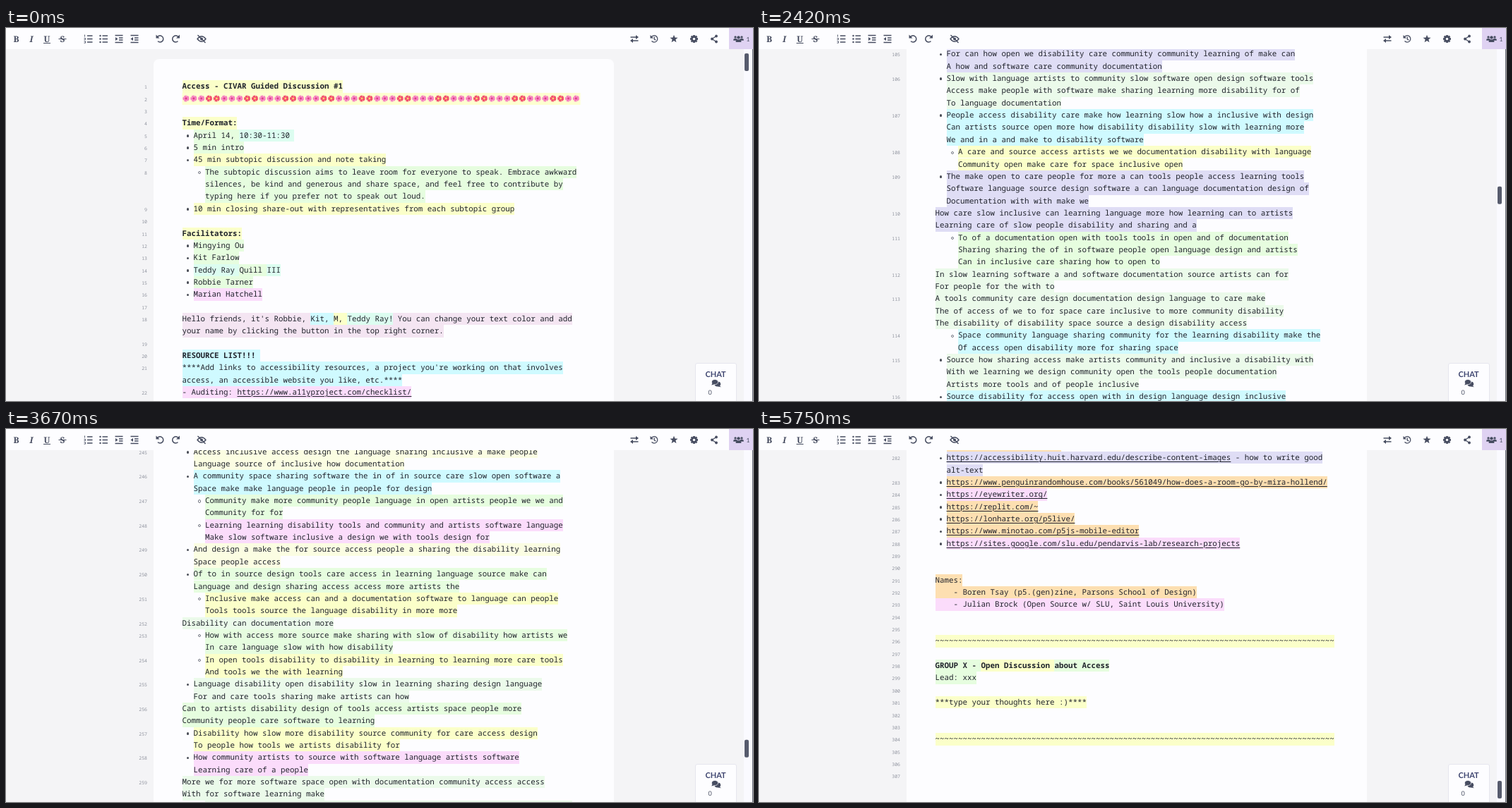
Recreate the animation shown at these times as an HTML page. Size 1058x529 px, loop 6010 ms.

```html
<!DOCTYPE html>
<html lang="en">
<head>
<meta charset="utf-8">
<title>Shared notes</title>
<style>
html, body { margin: 0; width: 100%; height: 100%; overflow: hidden; background: #f4f4f6; }
body { position: relative; text-rendering: geometricPrecision; }
#view { position: absolute; left: 0; top: 30px; width: 1058px; height: 499px; overflow: hidden; }
#pad { position: absolute; left: 0; top: -30px; width: 1058px; }
#card { position: absolute; left: 209px; top: 44px; width: 652px; height: 10300px; border-radius: 8px; background: #fdfdff; }
.row { position: absolute; left: 0; height: 17.35px; white-space: pre; color: #20232c;
  font: 10.84px/17.35px "Noto Sans Mono", "DejaVu Sans Mono", monospace; }
.row b, .row span { display: inline-block; font-weight: inherit; }
.row.h { font-weight: 700; }
.row u { text-underline-offset: 1.5px; text-decoration-thickness: 1px; }
.row i { position: absolute; right: calc(100% - 200px); top: 1px; font-style: normal; font-weight: 400; font-size: 6.5px; color: #8f939e; }
.row s { position: absolute; top: 7.4px; width: 3.6px; height: 3.6px; border-radius: 50%; background: #4a4d57; }
.row s.o { width: 2.2px; height: 2.2px; background: none; border: .8px solid #777a85; }
svg { position: absolute; left: 0; top: 0; }
#bar { background: #fdfdff; }
#track { position: absolute; left: 1045px; top: 30px; width: 12px; height: 499px; background: #fafaff; border-right: 1px solid #686b78; }
#thumb { position: absolute; left: 1px; top: 0; width: 6px; height: 25px; border-radius: 2px; background: #575c6d; }
#chat { position: absolute; left: 976px; top: 475px; width: 57px; height: 60px; background: #fdfdff;
  border: 1px solid #e6e6ee; border-radius: 3px 3px 0 0; }
</style>
</head>
<body>
<div id="view"><div id="pad"><div id="card"></div></div></div>
<div id="track"><div id="thumb"></div></div>
<div id="chat"></div>
<svg id="bar" width="1058" height="30"></svg>
<svg id="talk" width="1058" height="529" fill="#474d61" style="pointer-events:none">
  <text x="990.5" y="494.5" font-family="Lato, sans-serif" font-weight="700" font-size="11" fill="#3f4670">CHAT</text>
  <ellipse cx="1007.8" cy="505" rx="4.4" ry="3.4"/><path d="M1010 507l3 2.2-4.500-.7z"/>
  <ellipse cx="1004" cy="502" rx="4.600" ry="3.600" stroke="#fdfdff" stroke-width=".7"/><path d="M1000.500 503.500l-1.200 3 4-1.200z"/>
  <text x="994.5" y="519.5" font-family="Lato, sans-serif" font-size="9">0</text>
</svg>
<script>
const PITCH = 17.35, END = 9602, LOOP = 6010;
const HUES = { y: '#fbffc9', g: '#e6fddf', n: '#dcfdf0', c: '#cffaff', p: '#fbdcfb', m: '#f4e5f2',
  l: '#dfddf5', o: '#fddfb1', u: '#f0daf4', r: '#f8dde0', k: '#ebfaea', w: '#fbfde2', '.': 'none' };
const LEFT = { b: 265.5, B: 265.5, o: 282, O: 282 };
const pad = document.getElementById('pad');
const thumb = document.getElementById('thumb');

let seed = 7;
const rnd = () => (seed = seed * 16807 % 2147483647) / 2147483647;
const pick = list => list[Math.floor(rnd() * list.length)];
const escape = s => s.replace(/&/g, '&amp;').replace(/</g, '&lt;');

// Row syntax: hue, kind (h bold, - plain, b/o bullets, capitals and + continue), then text with {hue} switches.
const continues = kind => kind && 'BO+'.includes(kind);

function addRow(row, src, num) {
  const kind = src[1], left = LEFT[kind] || 249.5;
  const parts = (src[0] + '}' + src.slice(2)).split('{');
  const text = parts.map(part => {
    const cut = part.indexOf('}');
    const body = escape(part.slice(cut + 1)).replace(/https:\S+/g, '<u>$&</u>');
    return `<span style="background:${HUES[part[0]]}">${body}</span>`;
  }).join('');
  const dot = kind === 'b' || kind === 'o' ? `<s class="${kind}" style="left:${left - 9.700}px"></s>` : '';
  const label = num ? `<i style="right:auto;left:0;width:200px;text-align:right">${num}</i>` : '';
  pad.insertAdjacentHTML('beforeend',
    `<div class="row ${kind || ''}" style="top:${(74.3 + row * PITCH).toFixed(2)}px">${label}${dot}` +
    `<b style="margin-left:${left}px">${src ? text : ''}</b></div>`);
}

function block(row, line, text) {
  for (const src of text.split('\n')) addRow(row++, src, continues(src[1]) ? 0 : line++);
}

const words = ('access open source tools community how can we make software more inclusive for artists and ' +
  'people with disability language documentation sharing care slow design learning space to the of in a').split(' ');

function sentence(size) {
  let s = pick(words);
  s = s[0].toUpperCase() + s.slice(1);
  for (;;) {
    const w = ' ' + pick(words);
    if (s.length + w.length > size) return s;
    s += w;
  }
}

// Passing notes: spreads count numbered lines over the rows [from, to).
function notes(from, to, line, count) {
  const at = r => Math.floor((r - from) * count / (to - from));
  let kind, hue;
  for (let r = from; r < to; r++) {
    const fresh = r === from || at(r) !== at(r - 1), more = at(r + 1) === at(r);
    if (fresh) { kind = pick('bbbo-'); hue = pick('yggckkwlp'); }
    const mark = fresh ? kind : { b: 'B', o: 'O', '-': '+' }[kind];
    const blank = r === from || (fresh && !more && rnd() < .3);
    addRow(r, blank ? '' : hue + mark + sentence(more ? 80 : 20 + rnd() * 50), fresh ? line + at(r) : 0);
  }
}

const wave = '~'.repeat(87);

block(0, 1, `yhAccess - CIVAR Guided Discussion #1


yhTime/Format:
gbApril 14, {n}10:30-11:30 
gb5 min intro
yb

`.split('\n').slice(0, 6).join('\n'));
block(6, 7, `yb45 min subtopic discussion and note taking
goThe subtopic discussion aims to leave room for everyone to speak. Embrace awkward
gOsilences, be kind and generous and share space, and feel free to contribute by
gOtyping here if you prefer not to speak out loud.
yb10 min closing share-out with representatives from each subtopic group

yhFacilitators:
gbMingying Ou
gbKit Farlow
nbTeddy Ray {g}Quill {n}III
gbRobbie Tarner
pbMarian Hatchell

m-Hello friends, it's Robbie, {c}Kit, {y}M, {n}Teddy Ray!{m} You can change your text color and add
m+your name by clicking the button in the top right corner.

chRESOURCE LIST!!! 
c-****Add links to accessibility resources, a project you're working on that involves
c+access, an accessible website you like, etc.****
p-- Auditing: https://www.a11yproject.com/checklist/`);
notes(26, 120, 23, 28);
block(120, 51, `wOFrequent issues like FAQ
wbIn what ways can open source software help to democratize access to creative tools
wBand technologies, particularly for marginalized communities?
wbAccessible contribution for beginner
woHow to cultivate a welcoming environment to invite new and diverse contributors?
wOWhat's an accessible first contribution?

l-Names:
l-    - Oscar Verlen (VLTA, OPENRNDR)
l-    - Meera Solan (Vantelium, @quietlattices)
w-    - Rolf
w-    - Desmond Foo
w-    - Jonas
w-    - Max
w-    - Miriam
w-    - Oscar
w-    - Carl
w-    - Ruvo

.-1. Writing Documentation{l} - Meera
.-2. Outreach - Brett
.-3. Make writing Codrum issues more accessible - Des/Rolf

w-***Grounding Questions thoughts below :)****
w-Des: access = provide opportunity for community who historically exclude, non western
w+focused software. make translation possible
w-Jonas: access and equity
w-Miriam: exercise individual agency with these tools, accessible hardware
w-Oscar: want to learn more about accessible in the software development process`);
notes(149, 301, 76, 60);
block(301, 136, `lBbeing too open or legible could be dangerous, problematic, or counter-productive?

k-Case Studies:
kbCase Study: an indigenous community wants to use an open source model to build tools
kBfor their culture and language revitalization initiatives. However, members of the
kBtribal community are concerned about issues of data sovereignty and cultural
kBappropriation, having had issues recently with linguists from a nearby univerisity
kBtraining AI data models on their language without the tribe's expressed consent. How
kBmight this indigenous community leverage the power of opensource approaches, while
kBprotecting their data and knowledge from misuse and appropriation?
kbCase Study: a queer designer wants to create an open source archive of resources
kBfor/with other LGBTQIA designers, while protecting the safety and identity of
kBcontributors living in areas where there could be negative consequences for being
kBassociated with a queer project. The designer believes it is important to include
kBattribution for the author of the resource and the contributor to the archive, as it
kBhonors the creator of the work and promotes accountability. How might the creator of
kBthis archive approach an open source project in a situation when it could be
kBdangerous to be legible?
kbCase Study: a collective of designers, activists, and programmers working on
kBabolitionist projects wants to build digital infrastructure for their
kBmovement/commuynity. In recent months, however, police and anti-abolitionist actors
kBhave been surveiling and targeting members through social media and other online
kBchannels. How might this collective adapt open source models to collectively build
kBabolitionist tools while protecting their members/community from
kBsurveillance/harassement?
kbCase Study: A programmer comes up with a "brilliant" project for an underserved
kBcommunity in their city. However, they are not from and do not personally know anyone
kBfrom that underserved community. How might this programmer approach this project with
kBan open source framework in a way that centers the needs and perspectives of the`);
notes(330, 386, 142, 43);
block(386, 185, `k-Marion,Bao
kbCIVAR Mutal Aid!
gbHow slow can you go?
gbWhat are the conditions for sovereignty?
gbRefusal as a part of access
gbParticipatory culture has always been here. How are we centering those learnings?


c-${wave}

chGROUP 4 - Creative Access
c-Lead: Kit
cbartists working with experimental accessibility
cbaesthetics of access. 
cbAccess as a foundational design element to a project - part of the concept from
cBbeginning - Not an afterthought, but a forethought
u-when you lack the access the most, when you need to be most creative
ubTidal KSL (Korean Sign Language): https://deafqueerkor.org/?ckattempt=1
uotools for hacking/re-signing language that can be oppressive
rbimportance of slowness
rbinterdependent structures: the state of nature is the state of our health.
uBbiodiversity and entanglement
ubdigital survivorship: what is it? how do we define it?
ubconsent as access
u-Blind VR Experience: Martin Fay <mtf208@uvx.edu>

c-How do we make digital fabirication more accessible? 
c-how can we insert things into the code, using the infrastructure to create and
c+accessibility tool?`);
notes(415, 550, 211, 70);
block(550, 281, `obhttps://slowsystems.com/a
lbhttps://accessibility.huit.harvard.edu/describe-content-images - how to write good
lBalt-text
obhttps://www.penguinrandomhouse.com/books/561049/how-does-a-room-go-by-mira-hollend/
pbhttps://eyewriter.org/
obhttps://replit.com/~
obhttps://lonharte.org/p5live/
obhttps://www.minotao.com/p5js-mobile-editor
pbhttps://sites.google.com/slu.edu/pendarvis-lab/research-projects


o-Names:
o-    - Boren Tsay (p5.(gen)zine, Parsons School of Design)
p-    - Julian Brock (Open Source w/ SLU, Saint Louis University)


y-${wave}

ghGROUP X - {y}Open Discussion {g}about Access
g-Lead: xxx

y-***type your thoughts here :)****


y-${wave}


`);

// Band of flowers on the second row
let flowers = '<rect x="249.5" y="92" width="564" height="17" fill="#fdffd0"/>';
for (let i = 0; i < 52; i++) {
  const red = i % 5 > 2;
  flowers += `<g transform="translate(${255 + i * 10.83} 100)">
    <circle r="2.9" fill="${red ? '#f4577c' : '#f78fc4'}" stroke="${red ? '#f2506c' : '#f77fc0'}" stroke-width="3.4" stroke-dasharray="3 .64"/>
    <circle r="1.4" fill="${red ? '#ffd46a' : '#d8417e'}"/></g>`;
}
pad.insertAdjacentHTML('beforeend', `<svg width="1058" height="120">${flowers}</svg>`);

// Toolbar
const letter = (x, s, extra) =>
  `<text x="${x}" y="19.5" text-anchor="middle" font-family="Noto Serif, serif" font-weight="700" font-size="12" ${extra}>${s}</text>`;
const stroke = (d, w = 1.4) => `<path d="${d}" fill="none" stroke="#474d61" stroke-width="${w}"/>`;
const solid = d => `<path d="${d}"/>`;
const bars = x => stroke(`M${x} 11h7.500M${x} 15.500h7.500M${x} 20h7.500`);
const dent = x => stroke(`M${x - 5.500} 10.500h11M${x} 14h5.500M${x} 17h5.500M${x - 5.500} 20.500h11`);
const person = (x, y, k) =>
  `<g transform="translate(${x} ${y}) scale(${k})"><circle cy="-3" r="2.3"/><path d="M-4 4v-1.500q0-2.500 2.500-2.500h3q2.500 0 2.500 2.500V4z"/></g>`;
let star = '', cog = '';
for (let i = 0; i < 10; i++) {
  const a = i * Math.PI / 5, r = i % 2 ? 2.5 : 5.8;
  star += `${946 + r * Math.sin(a)},${15.6 - r * Math.cos(a)} `;
}
for (let i = 0; i < 4; i++)
  cog += `<rect x="973.1" y="10" width="2.8" height="11" transform="rotate(${i * 45} 974.5 15.500)"/>`;

document.getElementById('bar').innerHTML = `<g fill="#474d61">
  <rect x="1024" width="34" height="30" fill="#dfd2f2"/>` +
  letter(14.5, 'B', '') + letter(36, 'I', 'font-style="italic"') + letter(58, 'U', 'font-weight="400"') + letter(80, 'S', '') +
  stroke('M53 21.500h10M74.500 15.500h11', 1.2) +
  bars(115) + stroke('M111.500 9.500v3M110.500 14.500h2v2h-2M110.500 18.800h2v2.400h-2', .9) +
  bars(136.5) + [11, 15.5, 20].map(y => `<circle cx="133.500" cy="${y}" r="1.200"/>`).join('') +
  dent(160) + solid('M155 13l3.500 2.500-3.500 2.500z') +
  dent(182) + solid('M180 13l-3.500 2.500 3.500 2.500z') +
  stroke('M214 13.500a4.600 4.600 0 1 1 1 5.300', 1.5) + solid('M212.500 9.500v5h5z') +
  stroke('M244.500 13.500a4.600 4.600 0 1 0-1 5.300', 1.5) + solid('M246 9.500v5h-5z') +
  stroke('M271 15.500q6-7.500 12 0q-6 7.500-12 0zM271.500 10l11 11', 1.4) + '<circle cx="277" cy="15.500" r="2"/>' +
  stroke('M884.500 13h8M887 18h8.500', 1.5) + solid('M892 10l4 3-4 3zM888 15l-4 3 4 3z') +
  stroke('M914 13a4.700 4.700 0 1 1 .5 5.500M918.200 12.500v3.300l2 1.300', 1.3) + solid('M912.500 10v4.500h4.500z') +
  `<polygon points="${star}"/>` +
  `<circle cx="974.500" cy="15.500" r="4.200"/>${cog}<circle cx="974.500" cy="15.500" r="1.700" fill="#fdfdff"/>` +
  stroke('M1006 11.500l-6 4 6 4', 1.3) +
  [[1006, 11.5], [1000, 15.5], [1006, 19.5]].map(([x, y]) => `<circle cx="${x}" cy="${y}" r="1.900"/>`).join('') +
  person(1033, 15, .7) + person(1042, 15, .7) + person(1037.5, 16.2, .95) +
  '<text x="1048.500" y="18.500" font-family="Lato, sans-serif" font-size="8.500">1</text></g>';

// Scroll keys: time, offset, speed in px per ms
const keys = [[1080, 0, 0], [1920, 2124, 3.3], [2830, 5264, 2.8], [3330, 6744, 2.4], [4000, END - 6, .05], [4250, END, 0]];

function scrollAt(t) {
  if (t <= keys[0][0]) return 0;
  const i = keys.findIndex(k => t <= k[0]);
  if (i < 0) return END;
  const [t0, y0, v0] = keys[i - 1], [t1, y1, v1] = keys[i];
  const d = t1 - t0, u = (t - t0) / d, w = 1 - u;
  return w * w * ((1 + 2 * u) * y0 + u * d * v0) + u * u * ((3 - 2 * u) * y1 - w * d * v1);
}

const STEP = 1000 / 12;
const start = performance.now();
function draw() {
  const t = (performance.now() - start) % LOOP;
  const frame = Math.floor((t + 5) / STEP);
  const y = scrollAt(Math.round(frame * STEP / 10) * 10);
  pad.style.transform = `translateY(${-Math.round(y)}px)`;
  thumb.style.transform = `translateY(${6 + 463 * y / END}px)`;
  requestAnimationFrame(draw);
}
draw();
</script>
</body>
</html>
```
